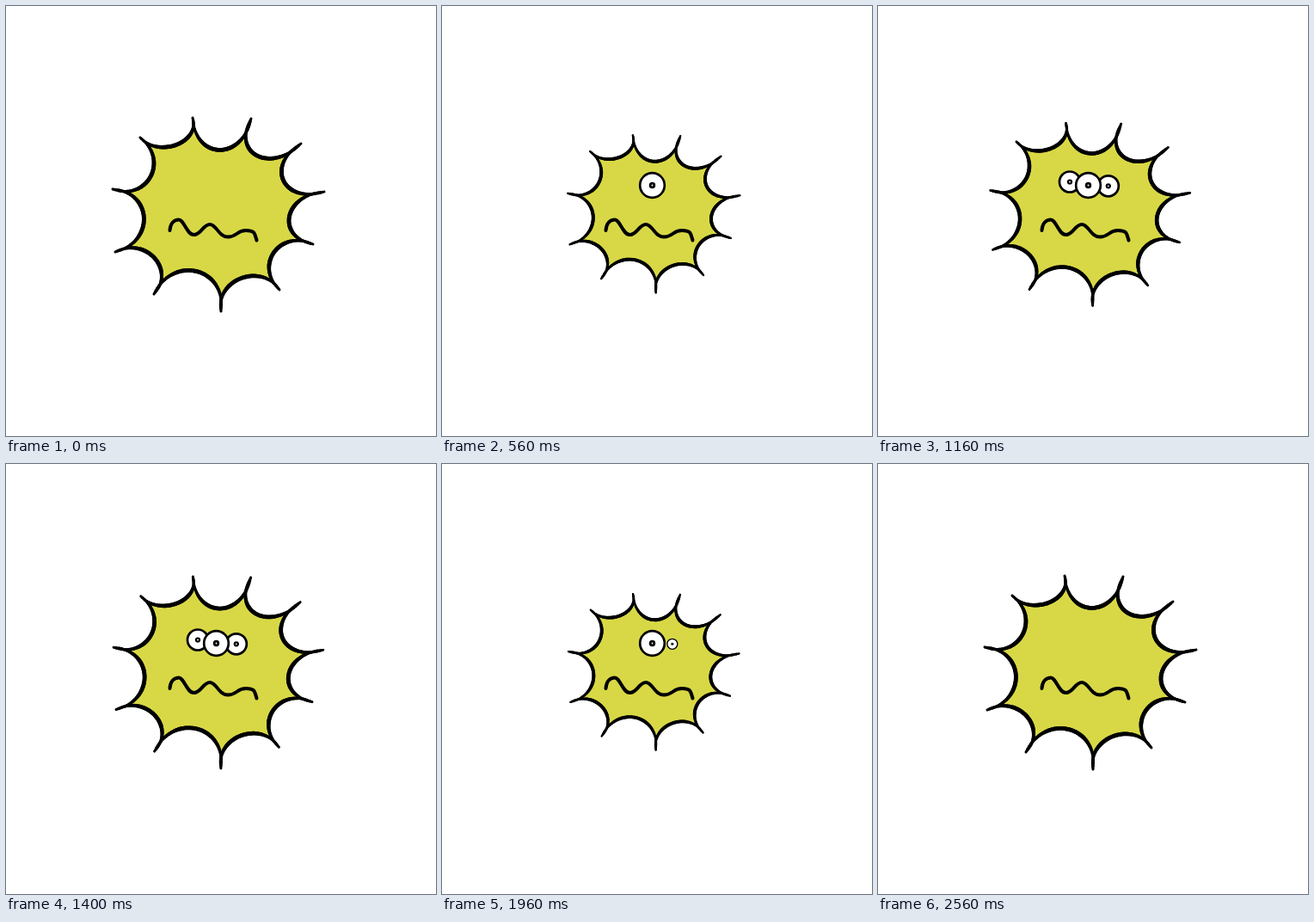
Recreate the animation shown at these times as an HTML page with a canvas. Size 500 by 500 pixels, loop 2.6 s.

```html
<!DOCTYPE html>
<html lang="en">
<head>
<meta charset="utf-8">
<title>Pulsing microbe</title>
<style>
  html, body { margin: 0; width: 100%; height: 100%; overflow: hidden; background: #fff; }
  canvas { display: block; width: 100vw; height: 100vh; }
</style>
</head>
<body>
<canvas id="stage" width="500" height="500"></canvas>
<script>
const ctx = document.getElementById('stage').getContext('2d');
const LOOP = 2600, STEP = 40, PULSE = 1280, POP = 200;
const CENTER = [243, 239], MIN_SCALE = 0.805;
const YELLOW = '#d8d846', INK = '#000';

// Spike tips clockwise, each with the depth of the valley that follows it.
const SPIKES = [
  [217, 130, 37], [285, 131, 36], [343, 160, 37], [370, 216, 34],
  [357, 277, 31], [318, 330, 28], [250, 355, 38], [172, 335, 29],
  [127, 286, 35], [124, 213, 32], [156, 153, 23]
];

const MOUTH = new Path2D('M190.5 261C191 253 195 248.5 201 248.5S210 266 218.5 266 ' +
  '229 254 237 254 247 268.5 258 268.5 268 261 279 261 289 265 291.5 272.5');

// In order of appearance; each new eye sits behind the earlier ones.
const EYES = [
  { x: 244.5, y: 208.5, r: 14.3 },
  { x: 267.8, y: 209.3, r: 12 },
  { x: 223, y: 204.5, r: 12 }
];

const clamp = v => Math.min(1, Math.max(0, v));
const mix = (a, b, u) => a + (b - a) * u;
const cubic = (a, b, c, d, u) =>
  a * (1 - u) ** 3 + 3 * b * u * (1 - u) ** 2 + 3 * c * u * u * (1 - u) + d * u ** 3;

// Easing like CSS cubic-bezier(x1, 0, x2, 1).
function easing(x1, x2) {
  return x => {
    let lo = 0, hi = 1;
    for (let i = 0; i < 24; i++) {
      const mid = (lo + hi) / 2;
      if (cubic(0, x1, x2, 1, mid) < x) lo = mid; else hi = mid;
    }
    return cubic(0, 0, 1, 1, lo);
  };
}
const shrinkEase = easing(0.53, 0.64);
const growEase = easing(0.42, 1);

// A curve from tip to tip that sags towards the centre.
function valley([x0, y0, depth], [x1, y1], n = 40) {
  const dx = CENTER[0] - (x0 + x1) / 2, dy = CENTER[1] - (y0 + y1) / 2;
  const pull = depth * 4 / 3 / Math.hypot(dx, dy);
  const side = (a, b, d, u) =>
    cubic(a, mix(a, b, 0.1) + d * pull, mix(b, a, 0.1) + d * pull, b, u);
  return Array.from({ length: n + 1 }, (_, i) =>
    [side(x0, x1, dx, i / n), side(y0, y1, dy, i / n)]);
}
const valleys = SPIKES.map((s, i) => valley(s, SPIKES[(i + 1) % SPIKES.length]));

function inkValley(pts) {
  const last = pts.length - 1;
  for (let i = 0; i < last; i++) {
    ctx.lineWidth = mix(2.6, 4.8, clamp(3 * Math.min(i, last - i) / last));
    ctx.beginPath();
    ctx.moveTo(...pts[i]);
    ctx.lineTo(...pts[i + 1]);
    ctx.stroke();
  }
}

function disc(x, y, r, color) {
  ctx.fillStyle = color;
  ctx.beginPath();
  ctx.arc(x, y, r, 0, 2 * Math.PI);
  ctx.fill();
}

function scaled(x, y, s, draw) {
  ctx.save();
  ctx.translate(x, y);
  ctx.scale(s, s);
  ctx.translate(-x, -y);
  draw();
  ctx.restore();
}

function bodyScale(t) {
  const p = (t % PULSE) / PULSE * 2;
  return mix(MIN_SCALE, 1, p < 1 ? 1 - shrinkEase(p) : growEase(p - 1));
}

function drawBody() {
  ctx.fillStyle = YELLOW;
  ctx.beginPath();
  for (const p of valleys.flat()) ctx.lineTo(...p);
  ctx.fill();
  valleys.forEach(inkValley);
}

function drawEye({ x, y, r }) {
  disc(x, y, r, '#fff');
  ctx.lineWidth = 2.7;
  ctx.stroke();
  disc(x, y, r * 0.26, INK);
  disc(x, y, 0.9, '#fff');
}

function eyeScale(i, t) {
  const grow = 320 + 280 * i, shrink = 2040 - 180 * i;
  return clamp((t - grow) / POP) - clamp((t - shrink) / POP);
}

function render(t) {
  ctx.fillStyle = '#fff';
  ctx.fillRect(0, 0, 500, 500);
  ctx.strokeStyle = INK;
  ctx.lineCap = ctx.lineJoin = 'round';
  scaled(...CENTER, bodyScale(t), drawBody);
  ctx.lineWidth = 4;
  ctx.stroke(MOUTH);
  for (let i = EYES.length - 1; i >= 0; i--) {
    const s = eyeScale(i, t), eye = EYES[i];
    if (s > 0.001) scaled(eye.x, eye.y, s, () => drawEye(eye));
  }
}

const start = performance.now();
function tick() {
  const t = (performance.now() - start) % LOOP;
  render(Math.floor(t / STEP) * STEP);
  requestAnimationFrame(tick);
}
tick();
</script>
</body>
</html>
```
